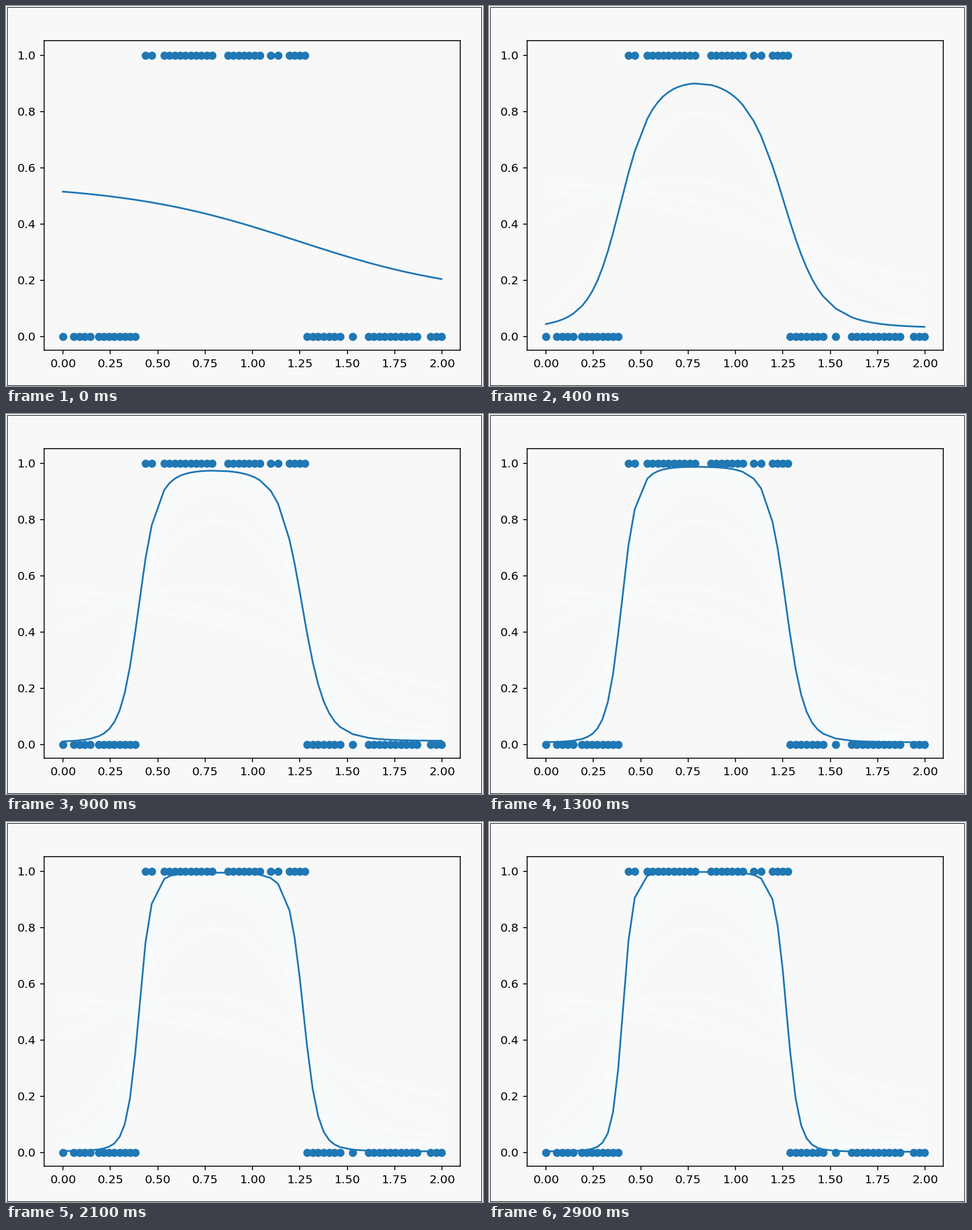
Recreate the animation shown at these times as a matplotlib script. Size 838x669 px, loop 3 s.

```python
import numpy as np
import matplotlib.pyplot as plt
from matplotlib.animation import FuncAnimation
from matplotlib.patches import Rectangle

W, H, DPI = 838, 669, 147.5
FRAMES, STEP_MS = 30, 100
HOLDS = (6, 14, 22)  # frames that repeat the one before
PX = 72 / DPI  # one pixel in points
BG, BLUE, TRAIL = "#f8f8f8", "#1f77b4", "#f8fbfc"

# Axes box and data scale, in pixels from the top left
LEFT, RIGHT, TOP, BOTTOM = 67, 798, 61.5, 606.3
X0, X_UNIT = 100.2, 333.0
Y0, Y_UNIT = 581.8, 495.0

# Samples lie in evenly filled runs (first and last pixel)
RUNS = [(100, 101), (119, 148), (163, 227), (245, 256), (278, 362), (390, 446),
        (465, 478), (498, 525), (529, 587), (609, 609), (637, 722), (746, 765)]
SPACING = 9

# Each key step: height, steepness and place of the rise, the same for the
# fall, and the offset below zero
KEYS = {
    0: (0, 1.6, 0.2, 1, 1, 1.4, 0.825),
    1: (0, 1.6, 0.2, 1.6, 1.2, 1.7, 1.37),
    2: (0.8, 1.65, 0.2, 2, 1.5, 1.6, 2.05),
    3: (2.5, 2.7, 0.34, 2.5, 2.6, 1.29, 2.9),
    4: (3.25, 3.4, 0.372, 3.2, 2.8, 1.275, 3.5),
    8: (4.4, 4.6, 0.383, 4.2, 3.7, 1.27, 4.55),
    26: (5.95, 6.2, 0.414, 6.15, 5, 1.264, 5.8),
}


def to_x(px):
    return (px - X0) / X_UNIT


def to_y(px):
    return (Y0 - px) / Y_UNIT


def slowing(step):
    """Progress of the fit, which slows down as training goes on."""
    return np.log(np.asarray(step) + 6)


def predict(step, x):
    """Sigmoid of one tanh rise and one tanh fall."""
    keys = slowing(list(KEYS))
    up, k_up, x_up, down, k_down, x_down, offset = (
        np.interp(slowing(step), keys, values) for values in zip(*KEYS.values()))
    logit = up * np.tanh(k_up * (x - x_up)) - down * np.tanh(k_down * (x - x_down)) - offset
    return 1 / (1 + np.exp(-logit))


def step_at(frame):
    return frame - sum(frame >= hold for hold in HOLDS)


def rect(x0, y0, x1, y1, color):
    """Filled rectangle in pixels from the top left."""
    fig.add_artist(Rectangle((x0 / W, 1 - y1 / H), (x1 - x0) / W, (y1 - y0) / H,
                             facecolor=color, linewidth=0, zorder=-1))


xs = to_x(np.concatenate([np.linspace(a, b, round((b - a) / SPACING) + 1)
                          for a, b in RUNS]))
labels = (xs > 0.41) & (xs < 1.283)
curves = [predict(s, xs) for s in range(step_at(FRAMES - 1) + 1)]

plt.rcParams["font.family"] = "DejaVu Sans"
fig = plt.figure(figsize=((W + 1e-6) / DPI, (H + 1e-6) / DPI), dpi=DPI, facecolor=BG)
rect(2, 2, W - 2, H, "black")
rect(3, 3, W - 3, H - 1, BG)

ax = fig.add_axes([LEFT / W, 1 - BOTTOM / H, (RIGHT - LEFT) / W, (BOTTOM - TOP) / H],
                  facecolor=BG)
ax.set_xlim(to_x(LEFT), to_x(RIGHT))
ax.set_ylim(to_y(BOTTOM), to_y(TOP))
ax.set_xticks(np.arange(0, 2.01, 0.25))
ax.set_yticks(np.arange(0, 1.01, 0.2))
ax.xaxis.set_major_formatter("{x:.2f}")
ax.yaxis.set_major_formatter("{x:.1f}")

trails = [ax.plot(xs, c, color=TRAIL, linewidth=5.5 * PX, zorder=1)[0] for c in curves]
ax.scatter(xs, labels.astype(float), color=BLUE, zorder=2)
line, = ax.plot(xs, curves[0], color=BLUE, linewidth=1.5, zorder=3)


def update(frame):
    step = step_at(frame)
    line.set_ydata(curves[step])
    for s, trail in enumerate(trails):
        trail.set_visible(s < step)
    return [line, *trails]


anim = FuncAnimation(fig, update, frames=FRAMES, init_func=lambda: update(0),
                     interval=STEP_MS, repeat=True, repeat_delay=0)
plt.show()
```
